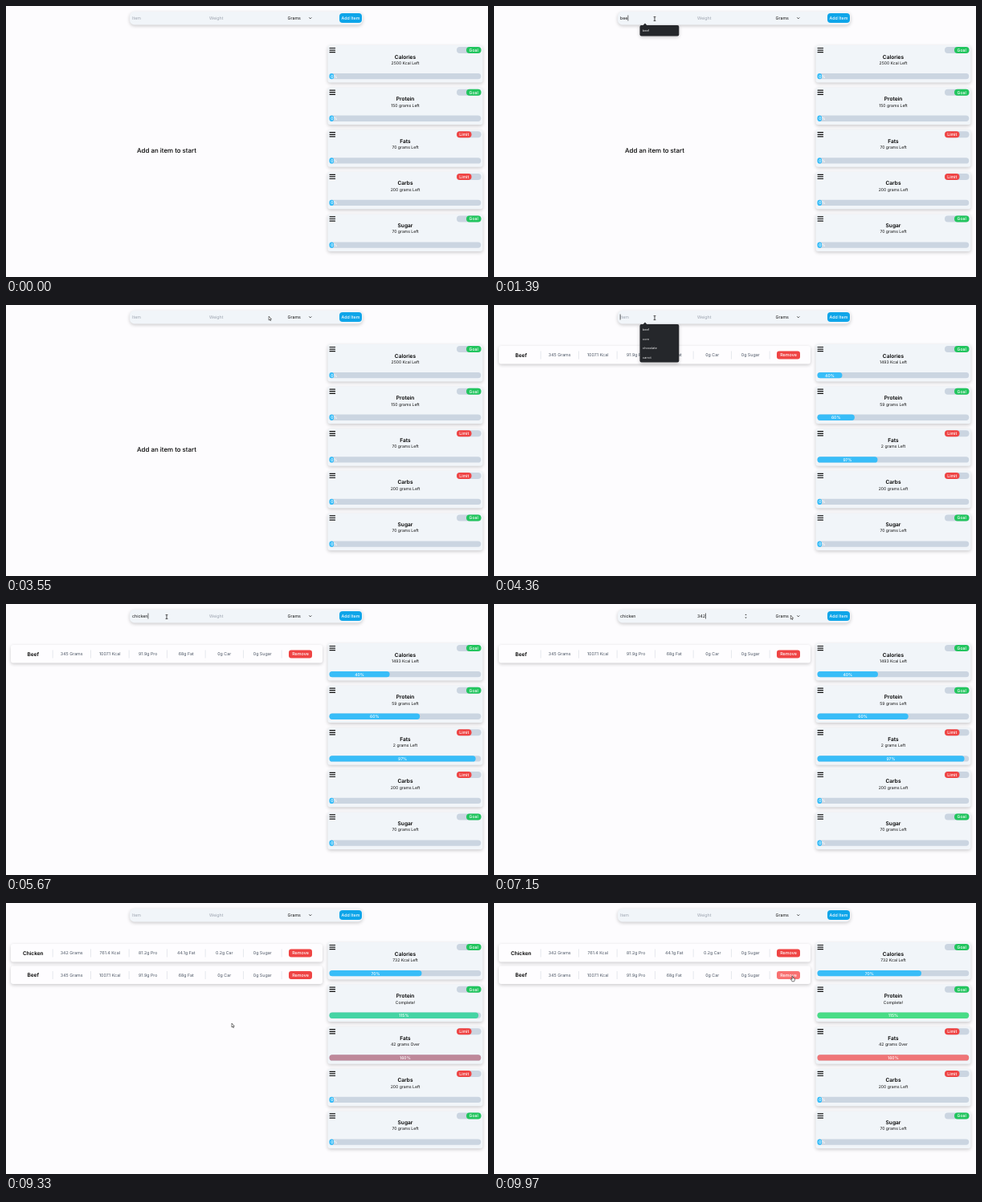
Recreate the animation shown at these times as an HTML page with a canvas. Size 600 by 338 pixels, loop 10 s.

```html
<!DOCTYPE html>
<html lang="en">
<head>
<meta charset="utf-8">
<title>Nutrition tracker</title>
<style>
html, body { margin: 0; width: 100%; height: 100%; overflow: hidden; background: #fdfcfe; }
canvas { display: block; width: 600px; height: 338px; }
</style>
</head>
<body>
<canvas id="stage"></canvas>
<script>
const LOOP = 10000, TRANSITION = 2000;
const ADDED = [3860, 8510];      // food rows arrive
const SUBMITTED = [2960, 7600];  // form is sent and cleared
const canvas = document.getElementById('stage');
const ctx = canvas.getContext('2d');
const dpr = window.devicePixelRatio || 1;
canvas.width = 600 * dpr;
canvas.height = 338 * dpr;

const BLUE = [56, 189, 248], GREEN = [74, 222, 128], RED = [248, 113, 113];
const nutrients = [
  { name: 'Calories', goal: true, shares: [0, .4, .7], notes: ['2500 Kcal Left', '1493 Kcal Left', '732 Kcal Left'] },
  { name: 'Protein', goal: true, shares: [0, .6, 1.15], notes: ['150 grams Left', '59 grams Left', 'Complete!'], done: GREEN },
  { name: 'Fats', goal: false, shares: [0, .97, 1.6], notes: ['70 grams Left', '2 grams Left', '42 grams Over'], done: RED },
  { name: 'Carbs', goal: false, shares: [0, 0, 0], notes: Array(3).fill('200 grams Left') },
  { name: 'Sugar', goal: true, shares: [0, 0, 0], notes: Array(3).fill('70 grams Left') }
];
const foods = [
  ['Beef', '345 Grams', '1007.1 Kcal', '91.9g Pro', '68g Fat', '0g Car', '0g Sugar'],
  ['Chicken', '342 Grams', '761.4 Kcal', '81.2g Pro', '44.1g Fat', '0.2g Car', '0g Sugar']
];
const history = ['beef', 'corn', 'chocolate', 'carrot'];

// Each form round: when a field gets focus and when each key is pressed.
const rounds = [
  { item: 'beef', itemKeys: [970, 1240, 1390, 1610], weight: '345', weightKeys: [2080, 2200, 2340], itemFocus: 700, weightFocus: 1940 },
  { item: 'chicken', itemKeys: [4790, 4930, 5060, 5200, 5330, 5460, 5600], weight: '342', weightKeys: [6500, 6640, 6800], itemFocus: 4130, weightFocus: 6330 }
];

// Pointer stops: time, x, y
const pointerPath = [
  [30, 300, 178], [620, 200, 16], [1650, 200, 16], [1900, 290, 16], [2360, 290, 16],
  [2480, 323, 20], [2850, 429, 16], [3250, 429, 16], [3900, 200, 16], [6090, 200, 16],
  [6300, 290, 16], [6850, 290, 16], [7400, 429, 16], [7900, 429, 16], [8420, 303, 130],
  [8900, 281, 152], [9330, 281, 152], [9850, 372, 94], [LOOP, 372, 94]
];

const mix = (a, b, p) => a + (b - a) * p;
const countPast = (times, t) => times.filter(time => t >= time).length;

// CSS "ease": cubic-bezier(.25, .1, .25, 1)
function ease(x) {
  if (x <= 0 || x >= 1) return x <= 0 ? 0 : 1;
  const bezier = (s, a, b) => 3 * s * (1 - s) ** 2 * a + 3 * s * s * (1 - s) * b + s ** 3;
  let low = 0, high = 1;
  for (let i = 0; i < 24; i++) {
    const mid = (low + high) / 2;
    if (bezier(mid, .25, .25) < x) low = mid; else high = mid;
  }
  return bezier(low, .1, 1);
}

function box(x, y, w, h, r, fill, shadow) {
  ctx.save();
  if (shadow) {
    ctx.shadowColor = 'rgba(0,0,0,.2)';
    ctx.shadowBlur = 4 * dpr;
    ctx.shadowOffsetY = 1.6 * dpr;
  }
  ctx.fillStyle = fill;
  ctx.beginPath();
  ctx.roundRect(x, y, w, h, Math.min(r, w / 2, h / 2));
  ctx.fill();
  ctx.restore();
}

// Draws text centred vertically on y and returns its width.
function text(str, x, y, size, fill, { weight = 400, align = 'center' } = {}) {
  ctx.font = `${weight} ${size}px Inter, sans-serif`;
  ctx.textAlign = align;
  ctx.fillStyle = fill;
  ctx.fillText(str, x, y + size * .36);
  return ctx.measureText(str).width;
}

function shape(points, fill, stroke) {
  ctx.beginPath();
  points.forEach(([x, y]) => ctx.lineTo(x, y));
  ctx.closePath();
  if (fill) { ctx.fillStyle = fill; ctx.fill(); }
  if (stroke) { ctx.strokeStyle = stroke; ctx.lineWidth = .6; ctx.stroke(); }
}

function pointerAt(t) {
  const next = pointerPath.findIndex(stop => stop[0] > t);
  const [t0, x0, y0] = pointerPath[next - 1], [t1, x1, y1] = pointerPath[next];
  const u = (t - t0) / (t1 - t0), p = u * u * (3 - 2 * u);
  return { x: mix(x0, x1, p), y: mix(y0, y1, p) };
}

const inside = (p, x, y, w, h) => p && p.x >= x && p.x <= x + w && p.y >= y && p.y <= y + h;

function formState(t) {
  const round = rounds[countPast(SUBMITTED, t)];
  if (!round) return { item: '', weight: '', focus: '' };
  return {
    item: round.item.slice(0, countPast(round.itemKeys, t)),
    weight: round.weight.slice(0, countPast(round.weightKeys, t)),
    focus: t >= round.weightFocus ? 'weight' : t >= round.itemFocus ? 'item' : ''
  };
}

function drawField(value, hint, x, focused) {
  const width = text(value || hint, x, 15, 5.3, value ? '#111' : '#9ca3af', { align: 'left' });
  if (focused) box(x + (value ? width + .2 : -.2), 11.5, .6, 7, 0, '#111');
}

function drawForm(form, pointer) {
  box(154, 7, 290, 16.5, 6, '#f1f5f9', true);
  drawField(form.item, 'Item', 157, form.focus === 'item');
  drawField(form.weight, 'Weight', 253, form.focus === 'weight');
  if (form.focus === 'weight' || inside(pointer, 250, 9, 68, 12)) {
    shape([[312.3, 14], [313.5, 12.4], [314.7, 14]], '#444');
    shape([[312.3, 16.4], [313.5, 18], [314.7, 16.4]], '#444');
  }
  text('Grams', 350.5, 15, 5.3, '#111', { align: 'left' });
  ctx.beginPath();
  ctx.moveTo(377.4, 14.4); ctx.lineTo(378.8, 15.8); ctx.lineTo(380.2, 14.4);
  ctx.strokeStyle = '#111'; ctx.lineWidth = .8; ctx.stroke();
  const hover = inside(pointer, 415, 9, 28, 12);
  box(415, 9, 28, 12, 4, hover ? '#38bdf8' : '#0ea5e9');
  text('Add Item', 429, 15, 5.3, '#fff', { weight: 500 });
}

function drawSuggestions(form) {
  const matches = history.filter(word => word.startsWith(form.item) && word !== form.item);
  if (form.focus !== 'item' || !matches.length) return;
  shape([[185.3, 24.5], [188, 21.6], [190.7, 24.5]], '#25272b');
  box(181.5, 24, 48.8, 2 + matches.length * 11.4, 2, '#25272b', true);
  matches.forEach((word, i) => text(word, 185, 31 + i * 11.4, 3.8, '#f4f4f5', { align: 'left' }));
}

function drawFood([name, ...facts], y, pointer) {
  box(6, y - 11.5, 388, 22.5, 3, '#fefdff', true);
  text(name, 33.7, y, 6.5, '#000', { weight: 600 });
  facts.forEach((fact, i) => text(fact, 81.7 + i * 47.5, y, 5.3, '#4b5563'));
  for (let i = 0; i < 7; i++) box(57.8 + i * 47.5, y - 5, .6, 10, 0, '#d5dae2');
  const hover = inside(pointer, 352, y - 5, 29, 10);
  box(352, y - 5, 29, 10, 3, hover ? '#f87171' : '#ef4444');
  text('Remove', 366.5, y, 5.4, '#fff', { weight: 500 });
}

function drawNutrient({ name, goal, shares, notes, done }, y, step, progress) {
  box(400.5, y, 193, 46.5, 3, '#f1f5f9', true);
  for (let i = 0; i < 3; i++) box(402.5, y + 2.9 + i * 2.6, 7.6, 1.2, .4, '#111');
  box(561, y + 2.1, 30.5, 8, 4, '#cbd5e1');
  box(goal ? 573 : 561, y + 2.1, 18.5, 8, 4, goal ? '#22c55e' : '#ef4444');
  text(goal ? 'Goal' : 'Limit', goal ? 582.2 : 570.2, y + 6.1, 5.2, '#fff', { weight: 500 });
  text(name, 497, y + 14.3, 6.6, '#000', { weight: 600 });
  text(notes[step], 497, y + 22.2, 5.1, '#111');

  const full = 188.7, share = mix(shares[Math.max(0, step - 1)], shares[step], progress);
  const width = Math.min(full, Math.max(5.6, share * full));
  const tint = step === 2 && done ? BLUE.map((c, i) => Math.round(mix(c, done[i], progress))) : BLUE;
  box(402.5, y + 35, full, 7.3, 3.6, '#cbd5e1');
  box(402.5, y + 35, width, 7.3, 3.6, `rgb(${tint})`);
  const label = Math.round(shares[step] * 100) + '%';
  text(label, shares[step] ? 402.5 + width / 2 : 408.3, y + 38.7, 5.1, '#fff', { weight: 500 });
}

function drawPointer(p, rows) {
  const overField = inside(p, 156, 9, 88, 12) || inside(p, 250, 9, 68, 12);
  const overButton = inside(p, 415, 9, 28, 12) ||
    Array.from({ length: rows }, (_, i) => inside(p, 352, 57.5 + i * 27.5, 29, 10)).some(Boolean);
  ctx.save();
  ctx.translate(p.x, p.y);
  if (overField) {
    box(-.4, -2.6, .8, 5.2, 0, '#222');
    box(-1.4, -3, 2.8, .7, 0, '#222');
    box(-1.4, 2.3, 2.8, .7, 0, '#222');
  } else if (overButton) {
    shape([[-.9, -2.8], [0, -2.8], [.2, -.5], [2.3, 0], [2.5, 1.8], [1.7, 3.8], [-1, 3.8], [-2.6, 1], [-1.9, .5], [-.9, 1.3]], '#fff', '#222');
  } else {
    shape([[0, -2], [0, 3], [1.1, 2], [1.9, 3.6], [2.6, 3.3], [1.9, 1.7], [3.3, 1.6]], '#fff', '#222');
  }
  ctx.restore();
}

function draw(t) {
  ctx.setTransform(dpr, 0, 0, dpr, 0, 0);
  ctx.textRendering = 'geometricPrecision';
  ctx.fillStyle = '#fdfcfe';
  ctx.fillRect(0, 0, 600, 338);

  const pointer = t >= pointerPath[0][0] ? pointerAt(t) : null;
  const step = countPast(ADDED, t);
  const progress = step ? ease((t - ADDED[step - 1]) / TRANSITION) : 1;
  const form = formState(t);

  drawForm(form, pointer);
  if (!step) text('Add an item to start', 200, 180.4, 7.9, '#000', { weight: 500 });
  foods.slice(0, step).reverse().forEach((food, i) => drawFood(food, 62.5 + i * 27.5, pointer));
  nutrients.forEach((nutrient, i) => drawNutrient(nutrient, 49 + i * 52.6, step, progress));
  drawSuggestions(form);
  if (pointer) drawPointer(pointer, step);
}

function tick() {
  draw(performance.now() % LOOP);
  requestAnimationFrame(tick);
}
tick();
</script>
</body>
</html>
```
